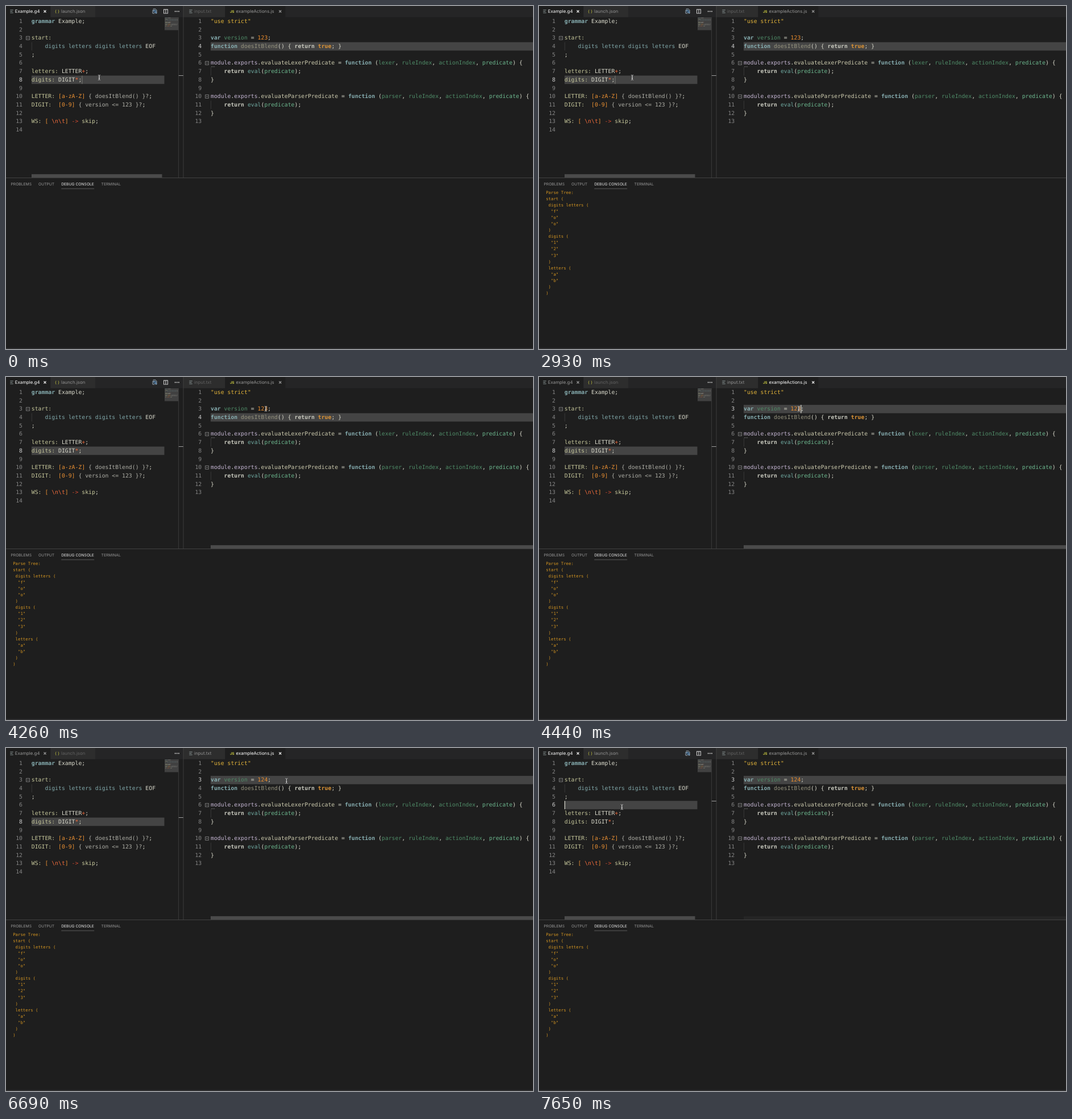
An HTML page that plays this animation: 927 px wide and 604 px high, repeating every 8 s.

```html
<!DOCTYPE html>
<html lang="en">
<head>
<meta charset="utf-8">
<title>Grammar debugging</title>
<style>
html, body { margin: 0; width: 100%; height: 100%; overflow: hidden; background: #1e1e1e; }
svg { display: block; width: 927px; height: 604px; }
text { white-space: pre; text-rendering: geometricPrecision; }
.code { font: 9.815px "DejaVu Sans Mono", monospace; }
.log { font: 7.35px "DejaVu Sans Mono", monospace; fill: #d29422; }
.tab { font: 7.85px Inter, sans-serif; }
.head { font: 6.74px Inter, sans-serif; fill: #969696; }
.num { fill: #858585; text-anchor: end; }
.num.on { fill: #cfcfcf; }
.line { fill: none; stroke: #c5c5c5; }
</style>
</head>
<body>
<svg id="stage" viewBox="0 0 927 604"></svg>
<script>
const LOOP = 8000, ROW = 14.7, TOP = 19.65;
const stage = document.getElementById('stage');
const $ = id => document.getElementById(id);

// One letter after "~" picks the colour; capitals are bold.
const ink = {
  K: '#86adb0', R: '#c6c7bc', T: '#dc9436', k: '#80a8aa', t: '#d9d9cb', r: '#c6c79b',
  o: '#ea9033', e: '#ee6a3c', a: '#cf4a31', g: '#aeaea6', s: '#e3b43a', v: '#4f8c68',
  n: '#f08f2d', f: '#96947f', m: '#c5b6d3', d: '#cdcbae', p: '#6cb78e', c: '#6fa9a0'
};
const grammar = [
  '~Kgrammar~t Example;', '', '~rstart:', '    ~kdigits letters digits letters ~tEOF', '~t;', '',
  '~rletters: ~tLETTER~e+~t;', '~rdigits: ~tDIGIT~e*~t;', '',
  '~rLETTER: ~o[a-zA-Z]~g { doesItBlend() }?~t;', '~rDIGIT:  ~o[0-9]~g { version <= 123 }?~t;', '',
  '~rWS: ~o[ ~e\\n\\t~o] ~a-> ~rskip~t;', ''
];
const hook = (name, arg) =>
  `~mmodule~t.~mexports~t.~devaluate${name}Predicate~t = ~Kfunction~t (~v${arg}~t, ~vruleIndex~t, ~vactionIndex~t, ~ppredicate~t) {`;
const evalRow = '    ~Rreturn ~ceval~t(~ppredicate~t);';
const actions = [
  '~s"use strict"', '', '~Kvar ~vversion~t = ~n123~t;',
  '~Kfunction ~fdoesItBlend~t() { ~Rreturn ~Ttrue~t; }', '',
  hook('Lexer', 'lexer'), evalRow, '~t}', '', hook('Parser', 'parser'), evalRow, '~t}', ''
];
const log = ['Parse Tree:', 'start (', ' digits letters (', '  "f"', '  "o"', '  "o"', ' )', ' digits (',
  '  "1"', '  "2"', '  "3"', ' )', ' letters (', '  "a"', '  "b"', ' )', ')'];

const esc = s => s.replace(/&/g, '&amp;').replace(/</g, '&lt;').replace(/>/g, '&gt;');
const tokens = row => row.split('~').map((s, i) => i ? [s[0], s.slice(1)] : ['t', s]).filter(p => p[1]);
const rowTop = n => TOP + (n - 1) * ROW;
const rect = (x, y, w, h, fill, more = '') => `<rect x="${x}" y="${y}" width="${w}" height="${h}" fill="${fill}" ${more}/>`;
const text = (cls, x, y, s, more = '') => `<text class="${cls}" x="${x}" y="${y}" ${more}>${s}</text>`;
const path = (d, more = '') => `<path class="line" d="${d}" ${more}/>`;

function span([c, s]) {
  const bold = c < 'a' ? ' font-weight="700"' : '';
  const id = s === '123' ? ' id="value"' : '';
  return `<tspan fill="${ink[c]}"${bold}${id}>${esc(s)}</tspan>`;
}

function editor(rows, x, numX, side) {
  return rows.map((row, i) => {
    const y = rowTop(i + 1) + 10.3;
    return text('code num', numX, y, i + 1, `id="${side}${i + 1}"`) +
      text('code', x, y, tokens(row).map(span).join(''));
  }).join('');
}

function fold(x, n) {
  const y = rowTop(n) + 7.4;
  return path(`M${x - 3} ${y - 3}h6v6h-6zM${x - 1.7} ${y}h3.4`, 'stroke-width=".7" style="stroke:#a0a0a0"');
}

const guide = (x, n) => path(`M${x} ${rowTop(n)}v${ROW}`, 'stroke-width=".6" style="stroke:#4a4a4a"');
const cross = (id, x) => path(`M${x - 2} 7.5l4 4m0-4l-4 4`, `id="${id}" stroke-width="1.1"`);
const fileIcon = x => path(`M${x} 7h5.5M${x} 9.5h4.2M${x} 12h5.5`, 'stroke-width=".95" style="stroke:#8b9696"');

function minimap() {
  let out = rect(279, 20, 24, 22.5, '#414141');
  grammar.forEach((row, i) => {
    let col = 0;
    for (const [c, s] of tokens(row)) {
      for (const w of s.matchAll(/\S+/g))
        out += rect(280 + (col + w.index) * .6, 20.6 + i * 1.22, w[0].length * .6, .75, ink[c], 'opacity=".4"');
      col += s.length;
    }
  });
  return out;
}

const beam = 'M-2.1 -4.5Q0 -4.5 0 -3.2V3.2Q0 4.5 -2.1 4.5M2.1 -4.5Q0 -4.5 0 -3.2V3.2Q0 4.5 2.1 4.5M-1.2 1.4h2.4';

stage.innerHTML =
  rect(0, 0, 927, 604, '#1e1e1e') +
  rect(0, 0, 927, 19.6, '#252526') +
  rect(0, 0, 78, 19.6, '#1e1e1e') + rect(78.5, 0, 78.5, 19.6, '#2d2d2d') +
  rect(312, 0, 73, 19.6, '#2d2d2d') + rect(385.5, 0, 106, 19.6, '#1e1e1e') +
  fileIcon(7.3) + text('tab', 15.8, 12.2, 'Example.g4', 'id="tabA"') + cross('closeA', 68.5) +
  text('tab', 86, 12, '{ }', 'fill="#cbcb41" font-weight="700" style="font-size:7px"') +
  text('tab', 97, 12.2, 'launch.json', 'id="tabB"') +
  fileIcon(322.3) + text('tab', 331, 12.2, 'input.txt', 'id="tabC"') +
  text('tab', 394, 12, 'JS', 'style="font-size:6.2px;font-weight:700;fill:#cbcb41"') +
  text('tab', 404.6, 12.2, 'exampleActions.js', 'id="tabD"') + cross('closeD', 482.3) +
  '<circle id="dirty" cx="482.3" cy="9.5" r="2.5" fill="#c5c5c5"/>' +
  '<g id="tools">' +
  path('M259 6.2v-1h4l2 2v5.6h-2.5M258 7.5h3M258 7.5v5.5h3.5', 'stroke-width=".9" style="stroke:#a9bccb"') +
  '<circle class="line" cx="261.8" cy="9.3" r="1.8" style="stroke:#75beff"/>' +
  path('M263 10.6l2 2.2', 'style="stroke:#75beff"') +
  path('M277.5 6h7v7h-7zM281 6v7M277.5 6.3h7', 'stroke-width="1.1"') + '</g>' +
  [297.7, 300.8, 303.9].map(x => `<circle cx="${x}" cy="9.5" r="1.1" fill="#c5c5c5"/>`).join('') +
  rect(45, 0, 233.5, ROW, '#444', 'id="rowL"') + rect(360, 0, 567, ROW, '#444', 'id="rowR"') +
  minimap() +
  guide(45.3, 4) + guide(360.4, 7) + guide(360.4, 11) +
  editor(grammar, 44.8, 29, 'L') + editor(actions, 360, 344.2, 'R') +
  fold(38.5, 3) + fold(353.6, 6) + fold(353.6, 10) +
  [361.2, 363.5, 365.8].map(x => rect(x, 106.4, 1, 1, '#a0a0a0')).join('') +
  rect(45, 296.2, 229.5, 5.8, '#4b4b4b', 'id="barL"') + rect(360, 296.2, 567, 5.8, '#4b4b4b', 'id="barR"') +
  rect(303, 19.6, .8, 283, '#3f3f3f') + rect(311.6, 0, .8, 302.5, '#444') +
  rect(303.8, 0, 8, 1, '#a0a0a0', 'id="mark"') +
  rect(0, 302.2, 927, .9, '#474747') + rect(0, 602.3, 927, 1.7, '#303031') +
  text('head', 8.5, 316.2, 'PROBLEMS') + text('head', 57, 316.2, 'OUTPUT') +
  text('head', 97.2, 316.2, 'DEBUG CONSOLE', 'style="fill:#e7e7e7"') + text('head', 167.6, 316.2, 'TERMINAL') +
  rect(97.2, 321.5, 58, .7, '#747474') +
  '<g id="log">' + log.map((s, i) => text('log', 12.2, 331.2 + i * 11.03, s)).join('') + '</g>' +
  rect(0, 0, 1.2, ROW, '#dcdcd2', 'id="caret"') +
  '<g id="mouse">' + path(beam, 'stroke-width="1.7" style="stroke:#111" opacity=".5"') +
  path(beam, 'stroke-width=".75" style="stroke:#e4e4e4"') + '</g>';

// Each row: start time, then the values held from that time on.
const pointer = [
  [0, 164, 126], [3190, 168, 123], [3280, 190, 111], [3370, 240, 88], [3460, 304, 67], [3540, 352, 53],
  [3630, 394, 47], [3720, 426, 45], [3810, 445, 49], [3900, 454, 54], [3990, 456.8, 55.8], [4080, 457.4, 56],
  [4260, 457, 56], [4530, 474, 57], [4620, 493.4, 58], [6860, 486, 58], [6950, 412, 66], [7030, 302, 82],
  [7120, 228, 93], [7210, 184, 99], [7300, 160, 102.5], [7380, 149, 103.8], [7470, 145.8, 104]
];
const blink = [
  [0, .3], [90, 0], [540, .5], [620, 1], [980, .5], [1070, 0], [1510, .5], [1590, 1], [1950, .5], [2040, 0],
  [2570, 1], [2930, .3], [3010, 0], [3460, .5], [3540, 1], [3900, .5], [3990, 0],
  [4440, 1], [5070, .5], [5160, 0], [5520, 1], [6240, .5], [6330, 0], [6860, 1], [7300, .5], [7380, 0], [7650, 1]
];
const held = (table, t) => table.findLast(r => r[0] <= t);
const ramp = (t, a, b) => Math.min(1, Math.max(0, (t - a) / (b - a)));
const set = (id, name, v) => $(id).setAttribute(name, v);
const show = (id, on) => set(id, 'opacity', +on);

function draw(t) {
  const left = t < 4440 || t >= 7650;
  const rowL = t < 7650 ? 8 : 6, rowR = t < 4440 ? 4 : 3;
  const dirty = t >= 5520 && t < 6690;
  const value = t < 5520 ? '123' : t < 5610 ? '12' : '124';

  set('tabA', 'fill', left ? '#fff' : '#979797');
  set('tabB', 'fill', left ? '#929292' : '#626262');
  set('tabC', 'fill', left ? '#626262' : '#929292');
  set('tabD', 'fill', left ? '#979797' : '#fff');
  $('closeA').style.stroke = left ? '#eee' : '#9a9a9a';
  $('closeD').style.stroke = left ? '#9a9a9a' : '#eee';
  show('closeD', !dirty);
  show('dirty', dirty);
  show('tools', left);
  show('log', t >= 1330);

  set('rowL', 'y', rowTop(rowL));
  set('rowR', 'y', rowTop(rowR));
  set('mark', 'y', Math.floor(rowTop(rowL)));
  grammar.forEach((_, i) => $('L' + (i + 1)).classList.toggle('on', i + 1 === rowL));
  actions.forEach((_, i) => $('R' + (i + 1)).classList.toggle('on', i + 1 === rowR));
  if ($('value').textContent !== value) $('value').textContent = value;

  show('barL', t < 5000 ? 1 - ramp(t, 3460, 3990) : ramp(t, 7030, 7130));
  show('barR', t < 5000 ? ramp(t, 3460, 3560) : 1 - .85 * ramp(t, 7030, 7470));

  const col = t < 4440 ? 15 : t < 7650 ? 14 + value.length : 0;
  set('caret', 'x', (left ? 44.8 : 360) + col * 5.9);
  set('caret', 'y', rowTop(left ? rowL : rowR));
  show('caret', held(blink, t)[1]);

  const [, x, y] = held(pointer, t);
  set('mouse', 'transform', `translate(${x} ${y})`);
}

const start = performance.now();
function tick() {
  draw((performance.now() - start) % LOOP);
  requestAnimationFrame(tick);
}
tick();
</script>
</body>
</html>
```
